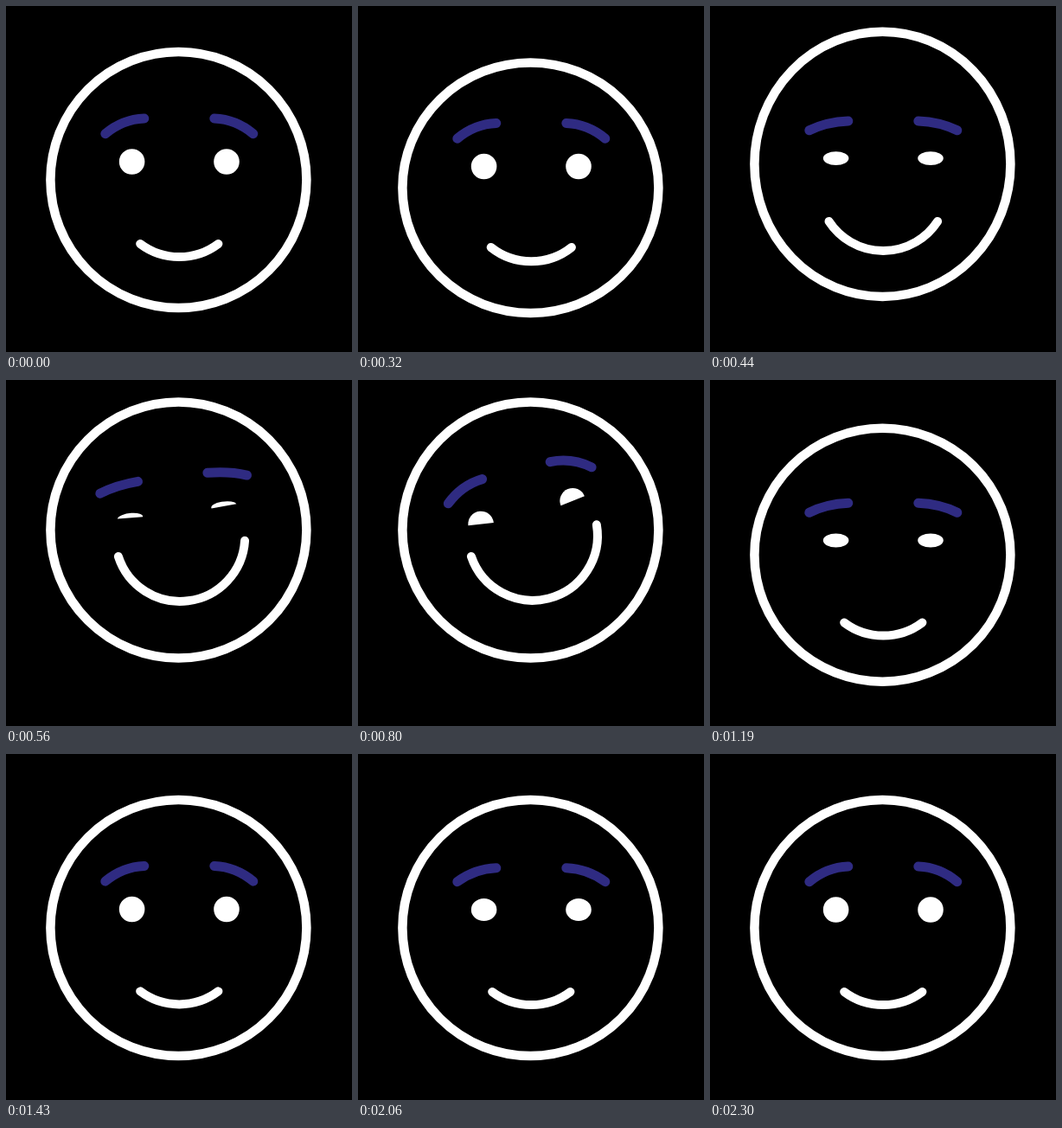
Write an HTML page that moves like this. It is 400x400 px and loops after 3380 ms.

```html
<!DOCTYPE html>
<html lang="en">
<head>
<meta charset="utf-8">
<title>Smiling face</title>
<style>
  html, body { margin: 0; width: 100%; height: 100%; overflow: hidden; background: #000; }
  svg { display: block; width: 100%; height: 100%; }
  .line { fill: none; stroke: #fff; stroke-width: 10; stroke-linecap: round; }
  .brow { stroke: #2f2b82; stroke-width: 11; }
  .eye { fill: #fff; }
</style>
</head>
<body>
<svg viewBox="0 0 400 400">
  <ellipse id="head" class="line" cx="199.4" rx="148" style="stroke-width:10.5"/>
  <g id="features">
    <path id="browL" class="line brow"/>
    <path id="browR" class="line brow"/>
    <path id="eyeL" class="eye"/>
    <path id="eyeR" class="eye"/>
    <path id="mouth" class="line"/>
  </g>
</svg>
<script>
const LOOP = 3380, STEP = 30, OFFSET = 20;
const REST_Y = 201, HEAD_RY = 148, EYE_R = 14.8, MOUTH_R = 75;
const DIP = 11, HEIGHT = 27.5, REBOUND = 3, LAG = 40;

const $ = id => document.getElementById(id);
const smooth = x => x * x * (3 - 2 * x);
const speedUp = x => x * x;
const slowDown = x => x * (2 - x);

// Progress from 0 to 1 between two times.
const ramp = (t, from, to, ease = smooth) =>
  ease(Math.min(1, Math.max(0, (t - from) / (to - from))));
// Rises to 1, holds, and falls back to 0.
const hold = (t, inFrom, inTo, outFrom, outTo) => ramp(t, inFrom, inTo) - ramp(t, outFrom, outTo);
// A single symmetric peak.
const bump = (t, centre, half) => ramp(Math.abs(t - centre), half, 0);

// Crouch, leap, drop, rebound and settle.
const hop = t =>
  DIP * ramp(t, 200, 360)
  - (DIP + HEIGHT) * ramp(t, 370, 508, slowDown)
  + (DIP + HEIGHT) * ramp(t, 875, 1105, speedUp)
  - (DIP + REBOUND) * ramp(t, 1112, 1285, slowDown)
  + REBOUND * ramp(t, 1285, 1430);

const stretch = t =>
  5.5 * bump(t, 440, 80) + 4 * bump(t, 1000, 100)
  - 4 * bump(t, 350, 110) - 4 * bump(t, 1110, 140);

const blinkAt = t => bump(t, 508, 135) + bump(t, 1121, 135) + bump(t, 2165, 135);

function drawSide(side, dir, blink, lid, slope) {
  const drop = 14 * blink;
  $('brow' + side).setAttribute('d',
    `M${85.5 * dir} -53.3Q${65.5 * dir} ${drop - 70} ${40.5 * dir} ${drop - 71}`);

  const eye = $('eye' + side), r = EYE_R;
  eye.setAttribute('d',
    `M${-r} 0A${r} ${r} 0 0 1 ${r} 0A${r} ${r * (1 - lid)} 0 0 1 ${-r} 0Z`);
  eye.setAttribute('transform',
    `translate(${54.7 * dir} -21) scale(1 ${1 - 0.94 * blink}) rotate(${-dir * slope * lid})`);
}

function drawMouth(grin) {
  const angle = (37 + 48.4 * grin) * Math.PI / 180;
  const x = MOUTH_R * Math.sin(angle);
  const y = 14 - 7.5 * grin + MOUTH_R * Math.cos(angle);
  $('mouth').setAttribute('d', `M${-x} ${y}A${MOUTH_R} ${MOUTH_R} 0 0 0 ${x} ${y}`);
}

function draw(t) {
  $('head').setAttribute('cy', REST_Y + hop(t));
  $('head').setAttribute('ry', HEAD_RY + stretch(t));

  const tilt = -14.2 * hold(t, 440, 680, 920, 1130);
  $('features').setAttribute('transform',
    `translate(200.3 ${REST_Y + hop(t - LAG)}) rotate(${tilt})`);

  const blink = blinkAt(t);
  const lid = hold(t, 500, 560, 1080, 1140);
  const slope = 8 + 7 * ramp(t, 880, 990);
  drawSide('L', -1, blink, lid, slope);
  drawSide('R', 1, blink, lid, slope);
  drawMouth(hold(t, 283, 640, 880, 1110));
}

const start = performance.now();
function tick() {
  const t = (performance.now() - start) % LOOP;
  draw(Math.floor((t - OFFSET) / STEP) * STEP + OFFSET);
  requestAnimationFrame(tick);
}
tick();
</script>
</body>
</html>
```
